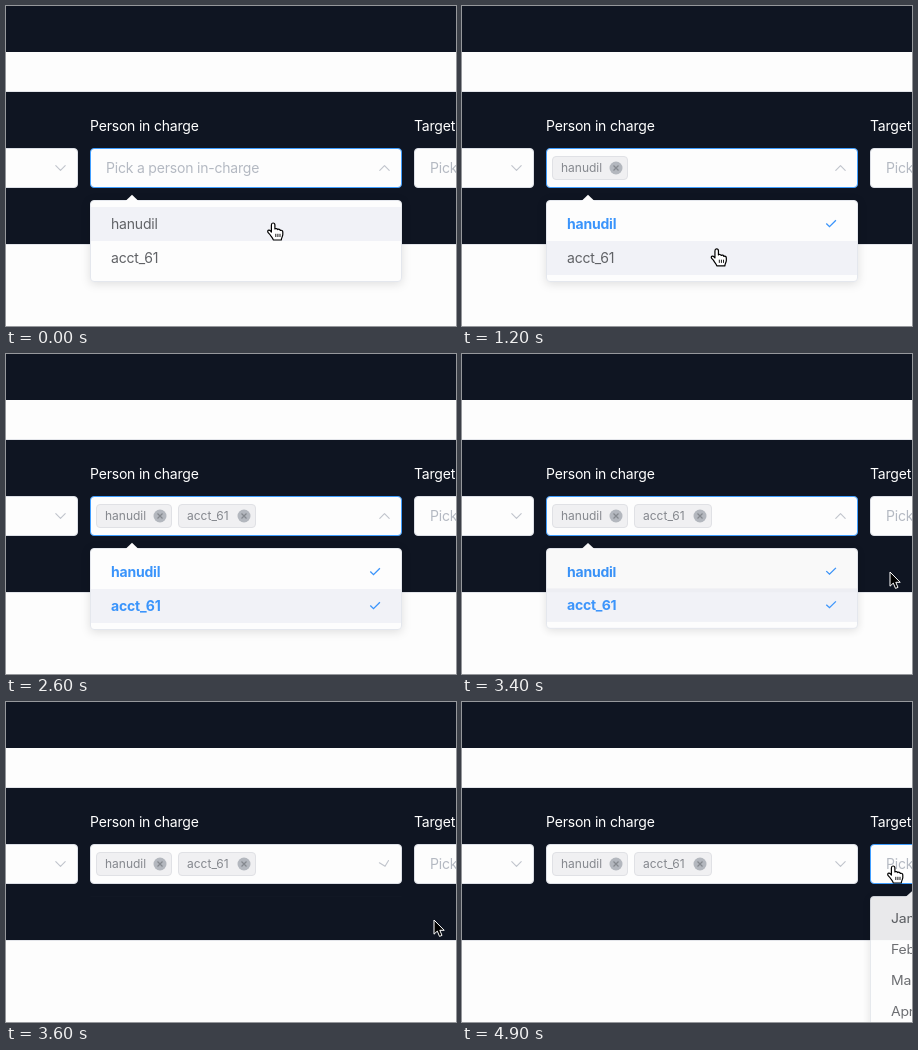
An HTML page for the animation above (5000 ms loop, 450x320 px).

```html
<!DOCTYPE html>
<html lang="en">
<head>
<meta charset="utf-8">
<title>Multi select</title>
<style>
  html, body { margin: 0; width: 100%; height: 100%; overflow: hidden; background: #fdfdfd; }
  svg { display: block; width: 450px; height: 320px; }
  text { font: 14px Inter, Roboto, sans-serif; letter-spacing: -.2px; fill: #606266; }
  .label { fill: #fff; }
  .hint { fill: #b4b9c2; }
  .field { fill: #fdfdfd; stroke: #dcdfe6; }
  .menu { fill: #fdfdfd; stroke: #e4e7ed; filter: drop-shadow(0 2px 5px rgba(0, 0, 0, .12)); }
  .chevron { fill: none; stroke: #c0c4cc; stroke-width: 1.1; stroke-linecap: round; stroke-linejoin: round; }
  .on text { font-weight: 700; fill: #3a94fb; }
  .check { fill: none; stroke: #3a94fb; stroke-width: 1.3; visibility: hidden; }
  .on .check { visibility: visible; }
  .tag rect { fill: #f0f0f2; stroke: #e0e1e5; }
  .tag text { font-size: 12px; letter-spacing: 0; fill: #85888e; }
  .tag circle { fill: #b3b7be; }
  .tag path { stroke: #85898f; stroke-width: 1.2; }
</style>
</head>
<body>
<svg viewBox="0 0 450 320">
  <rect width="450" height="320" fill="#fdfdfd"/>
  <rect width="450" height="46" fill="#0f1522"/>
  <rect y="86" width="450" height="152" fill="#0f1522"/>
  <path d="M0 85.5H450M0 238.5H450" stroke="#e3e5ea"/>

  <text class="label" x="84" y="125">Person in charge</text>
  <text class="label" x="408" y="125">Target month</text>

  <rect class="field" x="-200" y="142.5" width="271.5" height="39" rx="3.5"/>
  <rect class="field" id="person" x="84.5" y="142.5" width="311" height="39" rx="3.5"/>
  <rect class="field" id="month" x="408.5" y="142.5" width="311" height="39" rx="3.5"/>
  <path class="chevron" d="M-4.7 2.4 0-2.4 4.7 2.4" transform="translate(54.5 162) rotate(180)"/>
  <path class="chevron" id="caret" d="M-4.7 2.4 0-2.4 4.7 2.4"/>
  <text class="hint" id="hint" x="100" y="167">Pick a person in-charge</text>
  <text class="hint" x="424" y="167">Pick a month</text>
  <g id="tags"></g>

  <g id="people">
    <rect class="menu" x="84.5" y="194.5" width="311" height="81" rx="3.5"/>
    <path d="M119.5 195 126 188.8 132.5 195z" fill="#fdfdfd"/>
    <rect id="hover" x="85" width="310" height="34" fill="#f1f2f7"/>
    <g id="options"></g>
  </g>

  <g id="months">
    <rect class="menu" x="408.5" y="194.5" width="311" height="274" rx="3.5"/>
    <path d="M443.5 195 450 188.8 456.5 195z" fill="#fdfdfd"/>
  </g>

  <g id="cursor" stroke-linejoin="round">
    <g id="hand">
      <path d="M0 0c1.3 0 1.9.9 1.9 2v4c.5-.7 2.5-.6 2.8.6.8-.7 2.4-.4 2.6.9 1-.6 2.5 0 2.5 1.6v2.5c0 1.6-1.3 3-1.5 5.4h-8c-.4-2-2.2-3.5-3-5-.8-1.3-2.6-2.4-2.6-3.6 0-1.4 1.8-1.7 3-.2l.7.9V2C-1.6.8-.9 0 0 0z" fill="#fff" stroke="#000" stroke-width="1.2"/>
      <path d="M2.8 10.8v3.2M4.9 10.8v3.2M7 10.8v3.2" stroke="#000" stroke-width=".9"/>
    </g>
    <path id="arrow" d="M0 0v14.2l3.3-3.1 2.2 5.3 2.5-1-2.2-5.1h4.4z" fill="#000" stroke="#fff"/>
  </g>
</svg>
<script>
const LOOP = 5000;
const PICK = [200, 1500];
const CLOSE = 3400, FOCUS = 4600, OPEN = 4785;
const names = ['hanudil', 'acct_61'];
const $ = id => document.getElementById(id);

const clamp = v => Math.min(1, Math.max(0, v));
const span = (t, a, b) => clamp((t - a) / (b - a));
const mix = (a, b, k) => a + (b - a) * k;
const smooth = k => k * k * (3 - 2 * k);
const show = (el, on) => { el.style.display = on ? '' : 'none'; };

function bezier(x1, y1, x2, y2) {
  const at = (a, b, u) => 3 * a * u * (1 - u) ** 2 + 3 * b * u * u * (1 - u) + u ** 3;
  return x => {
    let lo = 0, hi = 1;
    for (let i = 0; i < 24; i++) {
      const u = (lo + hi) / 2;
      if (at(x1, x2, u) < x) lo = u; else hi = u;
    }
    return at(y1, y2, lo);
  };
}
const ease = bezier(.25, .1, .25, 1);
const zoom = bezier(.23, 1, .32, 1);

$('options').innerHTML = names.map((name, i) => `<g>
  <text x="105" y="${223 + 34 * i}">${name}</text>
  <path class="check" d="M364.3 ${217.5 + 34 * i}l3.2 3.1 6.4-6.4"/></g>`).join('');

$('tags').innerHTML = names.map((name, i) => {
  const x = 90 + 82 * i, w = 76 + 2 * i, c = x + w - 12;
  return `<g class="tag"><rect x="${x + .5}" y="150.5" width="${w - 1}" height="23" rx="3.5"/>
    <text x="${x + 9}" y="166">${name}</text><circle cx="${c}" cy="162" r="6.5"/>
    <path d="M${c - 2.5} 159.5l5 5m0-5l-5 5"/></g>`;
}).join('');

$('months').innerHTML += ['January', 'February', 'March', 'April'].map((m, i) =>
  `<text x="429" y="${223 + 34 * i}">${m}</text>`).join('');

function pointer(t) {
  if (t < 2700) {
    const k = smooth(span(t, 850, 1250));
    return [mix(267, 254, k), mix(217, 244, k)];
  }
  if (t < 3950) {
    const k = smooth(span(t, 2750, 3300));
    const arc = (a, c, b) => mix(mix(a, c, k), mix(c, b, k), k);
    return [arc(254, 350, 428), arc(244, 350, 218)];
  }
  const k = smooth(span(t, 3950, 4600));
  return [mix(428, 431, smooth(span(t, 4300, 4600))), mix(218, 164, k)];
}

function scaleMenu(el, k) {
  show(el, k > .005);
  el.setAttribute('opacity', k);
  el.setAttribute('transform', `translate(0 ${194 * (1 - k)}) scale(1 ${k})`);
}

function border(k) {
  const c = [[220, 64], [223, 158], [230, 255]].map(([a, b]) => Math.round(mix(a, b, k)));
  return `rgb(${c})`;
}

function draw(t) {
  PICK.forEach((at, i) => {
    show($('tags').children[i], t >= at);
    $('options').children[i].setAttribute('class', t >= at ? 'on' : '');
  });
  show($('hint'), t < PICK[0]);

  const [x, y] = pointer(t);
  $('hover').setAttribute('y', t < 2000 && y < 235 ? 201 : 235);

  scaleMenu($('people'), 1 - zoom(span(t, CLOSE, CLOSE + 300)));
  scaleMenu($('months'), zoom(span(t, OPEN, OPEN + 300)));
  $('person').style.stroke = border(1 - ease(span(t, CLOSE, CLOSE + 200)));
  $('month').style.stroke = border(ease(span(t, FOCUS, FOCUS + 200)));
  const turn = 180 * ease(span(t, CLOSE, CLOSE + 300));
  $('caret').setAttribute('transform', `translate(378.5 162) rotate(${turn})`);

  const inMenu = x > 84 && x < 396 && y > 194 && y < 276;
  const inField = y > 142 && y < 182;
  show($('hand'), inMenu || inField);
  show($('arrow'), !inMenu && !inField);
  const fade = t < 2700 ? 1 - span(t, 2150, 2550) : span(t, 2750, 2900);
  $('cursor').setAttribute('opacity', fade);
  $('cursor').setAttribute('transform', `translate(${x} ${y})`);
}

function tick() {
  draw(performance.now() % LOOP);
  requestAnimationFrame(tick);
}
tick();
</script>
</body>
</html>
```
